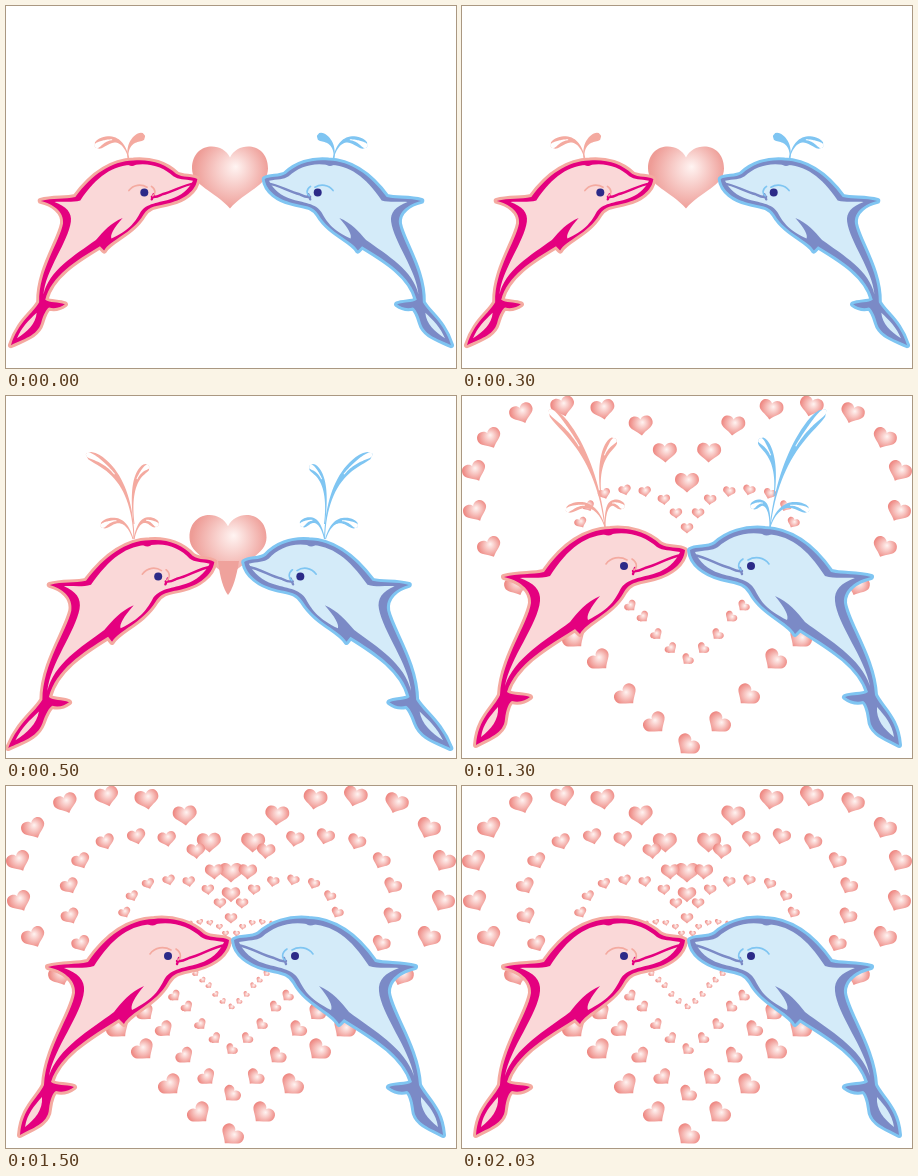
An HTML page with a canvas that plays this animation: 450x362 px, repeating every 2390 ms.

```html
<!DOCTYPE html>
<html lang="en">
<head>
<meta charset="utf-8">
<title>Dolphins in love</title>
<style>
  html, body { margin: 0; width: 100%; height: 100%; overflow: hidden; background: #fff; }
  canvas { display: block; }
</style>
</head>
<body>
<canvas id="stage" width="450" height="362"></canvas>
<script>
const ctx = document.getElementById('stage').getContext('2d');
const LOOP = 2390;

const PINK = { halo: '#f4aaa0', line: '#e4007f', body: '#fad8d8' };
const BLUE = { halo: '#7fc5f2', line: '#7b8ac6', body: '#d4ebf9' };
const EYE = '#2c2a88';

// Right-facing dolphin, in the coordinates of its largest pose
const OUTLINE = `M223 154 C216 150 206 153 198 148 C186 137 168 131 148 133
  C122 134 100 150 82 176 C70 179 56 177 42 181 C56 184 70 193 69 207
  C66 228 40 262 38 299 C32 312 16 322 14 349 C26 342 42 338 43 323
  C44 314 47 306 50 305 C58 307 64 304 68 301 C60 298 50 300 45 296
  C54 268 86 250 113 233 L118 238 C124 226 150 218 162 196
  C168 185 178 186 192 182 C208 178 222 168 223 154 Z`;
const BODY = `M218 156 C208 154 201 155 195 151 C184 141 168 135 150 138
  C124 138 106 152 88 180 C78 183 66 181 58 182 C72 187 79 194 78 205
  C76 228 48 262 43 290 C52 262 84 244 108 226 C116 216 124 206 138 200
  C128 212 124 220 126 224 C146 214 152 206 158 194
  C164 182 180 182 194 177 C204 174 214 166 218 156 Z`;
const FLUKE = 'M36 311 C28 320 21 328 19 341 C29 333 37 324 36 311 Z';
const MOUTH = 'M220 159 C206 161 196 169 183 172 C179 174 176 176 171 175 M173 172 L171 178';
const BROW = 'M144 168 C149 161 158 160 165 164 M170 163 C176 167 175 172 172 174';
const BLOWHOLE = 'M139 135 C143 141 150 141 153 135 Z';

// matrix: x' = a x + c y + e, y' = b x + d y + f; bend pushes the tail stem sideways.
// jets: start, control and end point of each spout, its half width, hollow or not.
const LEAP = { matrix: [1, 0, 0, 1, 0, 0], bend: 0, mirror: 451 };
const POSES = [
  { until: 500, matrix: [.86, .008, -.0348, .86, 4.9, 38.9], bend: 6, mirror: 450,
    heart: [224, 172, 38], rings: [],
    jets: [[123, 153, 115, 122, 89, 141, 7, 1], [122, 153, 120, 133, 139, 130, 6, 0]] },
  { until: 1000, matrix: [.8946, .018, -.0997, .9735, 24.2, 12], bend: 8, mirror: 446.5,
    heart: [222, 151, 38.5], tip: true, rings: [],
    jets: [[128, 143, 126, 75, 80, 58, 7, 1], [128, 128, 122, 80, 143, 70, 6, 1],
           [127, 143, 118, 114, 95, 131, 6, 1], [128, 143, 134, 114, 152, 130, 6, 1]] },
  { ...LEAP, until: 1500, rings: [1, .5],
    jets: [[143, 131, 134, 55, 87, 14, 8, 1], [139, 100, 134, 60, 154, 43, 7, 1],
           [143, 131, 132, 98, 104, 115, 6, 1], [143, 131, 143, 96, 162, 112, 6, 1]] },
  { ...LEAP, until: LOOP, rings: [1, .76, .5, .25], jets: [] }
];

// One half of the ring of hearts: distance from the axis, height
const RING = [[0, 87], [22, 57], [46, 30], [84, 14], [124, 11], [165, 18], [197, 43],
  [212, 76], [211, 116], [197, 152], [170, 190], [140, 217], [112, 243], [87, 265],
  [60, 300], [31, 328], [0, 350]];
const CENTER = { x: 225, y: 178 };

function bent(path, { matrix: [a, b, c, d, e, f], bend }) {
  return new Path2D(path.replace(/(\d+) (\d+)/g, (_, sx, sy) => {
    const x = +sx, y = +sy;
    const push = y > 250 && y < 350 ? bend * Math.sin(Math.PI * (y - 250) / 100) : 0;
    return `${a * x + c * y + e + push} ${b * x + d * y + f}`;
  }));
}

for (const pose of POSES) {
  pose.shapes = Object.fromEntries(Object.entries({ OUTLINE, BODY, FLUKE, MOUTH, BROW, BLOWHOLE })
    .map(([name, path]) => [name, bent(path, pose)]));
}

function fill(color, path) {
  ctx.fillStyle = color;
  ctx.fill(path);
}

function stroke(color, width, path) {
  ctx.strokeStyle = color;
  ctx.lineWidth = width;
  ctx.stroke(path);
}

function heart(x, y, r, angle = 0, edge = '#ee8882') {
  ctx.save();
  ctx.translate(x, y);
  ctx.rotate(angle);
  ctx.scale(r, r);
  const shade = ctx.createRadialGradient(.15, -.3, 0, .05, -.15, 1);
  shade.addColorStop(0, '#fff4f2');
  shade.addColorStop(1, edge);
  ctx.fillStyle = shade;
  ctx.beginPath();
  ctx.moveTo(0, -.54);
  ctx.bezierCurveTo(-.2, -.98, -1, -.95, -1, -.25);
  ctx.bezierCurveTo(-1, .2, -.4, .35, 0, .8);
  ctx.bezierCurveTo(.4, .35, 1, .2, 1, -.25);
  ctx.bezierCurveTo(1, -.95, .2, -.98, 0, -.54);
  ctx.fill();
  ctx.restore();
}

function ring(scale) {
  for (const [dx, y] of RING) {
    const tilt = y > 200 ? .7 : .45 * dx / 212;
    for (const side of dx ? [-1, 1] : [1]) {
      heart(CENTER.x + side * dx * scale, CENTER.y + (y - CENTER.y) * scale,
        11.5 * scale + .5, side * tilt * (y === 87 ? 0 : 1));
    }
  }
}

// A curved drop that widens from a thread to a round end
function drop([x0, y0, x1, y1, x2, y2, w], from, size) {
  const left = [], right = [];
  for (let i = 0; i <= 24; i++) {
    const u = i / 24, t = from + (1 - from) * u, s = 1 - t;
    const x = s * s * x0 + 2 * s * t * x1 + t * t * x2;
    const y = s * s * y0 + 2 * s * t * y1 + t * t * y2;
    const vx = s * (x1 - x0) + t * (x2 - x1), vy = s * (y1 - y0) + t * (y2 - y1);
    const half = (.5 + w * size * u * u * Math.sqrt(1 - u ** 8)) / Math.hypot(vx, vy);
    left.push([x - vy * half, y + vx * half]);
    right.unshift([x + vy * half, y - vx * half]);
  }
  const path = new Path2D();
  for (const point of [...left, ...right]) path.lineTo(...point);
  path.closePath();
  return path;
}

function dolphin(pose, { halo, line, body }) {
  const s = pose.shapes;
  const [a, b, c, d, e, f] = pose.matrix;
  for (const jet of pose.jets) {
    fill(halo, drop(jet, 0, 1));
    if (jet[7]) fill('#fff', drop(jet, .62, .5));
  }
  stroke(halo, 6, s.OUTLINE);
  fill(line, s.OUTLINE);
  fill(body, s.BODY);
  fill(body, s.FLUKE);
  fill(line, s.BLOWHOLE);
  stroke(line, 2.4, s.MOUTH);
  stroke(halo, 1.6, s.BROW);
  ctx.fillStyle = EYE;
  ctx.beginPath();
  ctx.arc(a * 162 + c * 170 + e, b * 162 + d * 170 + f, 4, 0, 2 * Math.PI);
  ctx.fill();
}

function draw(time) {
  const pose = POSES.find(p => time < p.until);
  ctx.fillStyle = '#fff';
  ctx.fillRect(0, 0, 450, 362);
  ctx.lineJoin = ctx.lineCap = 'round';
  pose.rings.forEach(ring);
  if (pose.heart) heart(...pose.heart, 0, '#ee9c96');
  if (pose.tip) fill('#efa29c', new Path2D('M212 165 H233 Q229 190 222 199 Q215 190 212 165 Z'));
  dolphin(pose, PINK);
  ctx.save();
  ctx.translate(pose.mirror, 0);
  ctx.scale(-1, 1);
  dolphin(pose, BLUE);
  ctx.restore();
}

const start = performance.now();
function tick() {
  draw((performance.now() - start) % LOOP);
  requestAnimationFrame(tick);
}
tick();
</script>
</body>
</html>
```
